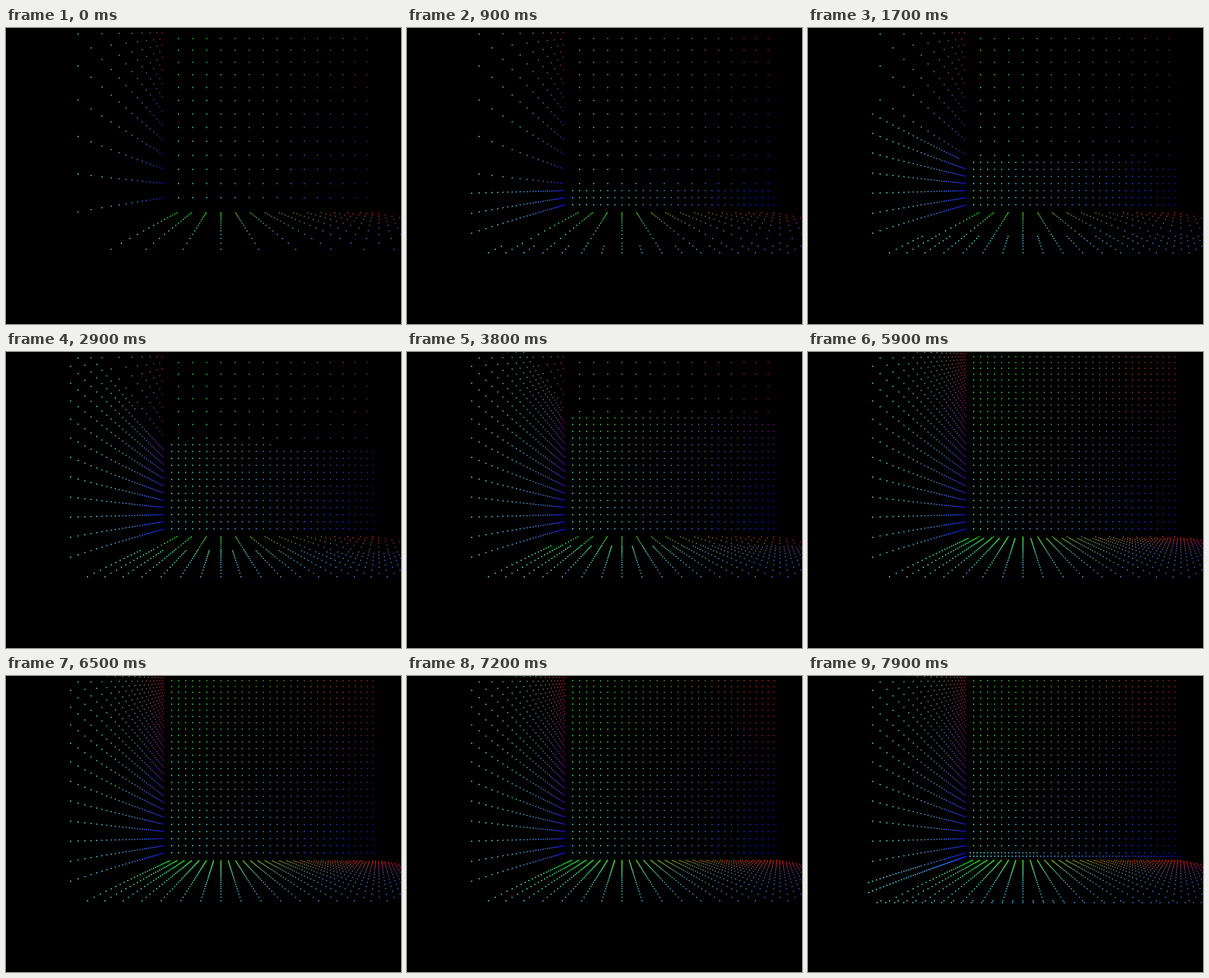
These frames come from a looping animation (600 by 450 pixels, 8 s). An HTML page with a canvas:

```html
<!DOCTYPE html>
<html lang="en">
<head>
<meta charset="utf-8">
<title>Dot room</title>
<style>
  html, body { margin: 0; width: 100%; height: 100%; overflow: hidden; background: #000; }
  canvas { display: block; }
</style>
</head>
<body>
<canvas id="stage" width="600" height="450"></canvas>
<script>
const ctx = document.getElementById('stage').getContext('2d');
const LOOP = 8000, STEP = 100;
const SCALE = 9 * 180 / Math.PI;            // nine pixels per degree of view
const CENTER = { x: 326.5, y: 245.05 };
const SIZE = 16, LEFT = -4, FLOOR = -1.6, FRONT = 7.94, BACK = FRONT + SIZE;
const RADIUS = 0.98;

// Each face maps s, t in 0..1 to a point in the room.
const faces = [
  (s, t) => [LEFT, FLOOR + t * SIZE, FRONT + s * SIZE],
  (s, t) => [LEFT + s * SIZE, FLOOR + t * SIZE, BACK],
  (s, t) => [LEFT + s * SIZE, FLOOR, FRONT + t * SIZE]
];

// Grids get finer; each one fills row by row along [time, dots] keys.
const grids = [
  { cells: 16, keys: [[0, 225]] },
  { cells: 32, keys: [[290, 0], [1700, 212], [2900, 387], [4600, 645], [6740, 961]] },
  { cells: 64, keys: [[7280, 0], [7900, 83]] }
];

function dotsAt(keys, time) {
  if (time <= keys[0][0]) return keys[0][1];
  for (let k = 1; k < keys.length; k++) {
    const [t0, n0] = keys[k - 1], [t1, n1] = keys[k];
    if (time <= t1) return Math.round(n0 + (n1 - n0) * (time - t0) / (t1 - t0));
  }
  return keys[keys.length - 1][1];
}

// Corners blend from pale cyan to blue, green and red.
function colorAt(s, t) {
  const red = s * t + 0.4 * (1 - s) * (1 - t);
  return `rgb(${[red, 1 - s, 1 - t].map(c => Math.round(c * 255))})`;
}

function drawDot(face, s, t) {
  const [x, y, z] = face(s, t);
  const px = CENTER.x + SCALE * Math.atan(x / z);
  const py = CENTER.y - SCALE * Math.atan(y / z);
  if (px < -2 || px > 602 || py < -2) return;
  ctx.fillStyle = colorAt(s, t);
  ctx.beginPath();
  ctx.arc(px, py, RADIUS, 0, 2 * Math.PI);
  ctx.fill();
}

function draw(time) {
  ctx.fillStyle = '#000';
  ctx.fillRect(0, 0, 600, 450);
  grids.forEach(({ cells, keys }, level) => {
    const count = dotsAt(keys, time), perRow = cells - 1;
    for (let n = 0; n < count; n++) {
      const col = n % perRow + 1, row = Math.floor(n / perRow) + 1;
      // Dots shared with the coarser grid are already there.
      if (level && col % 2 === 0 && row % 2 === 0) continue;
      for (const face of faces) drawDot(face, col / cells, row / cells);
    }
  });
}

const start = performance.now();
let shown = -1;
function tick() {
  const time = Math.floor((performance.now() - start) % LOOP / STEP) * STEP;
  if (time !== shown) draw(shown = time);
  requestAnimationFrame(tick);
}
tick();
</script>
</body>
</html>
```
